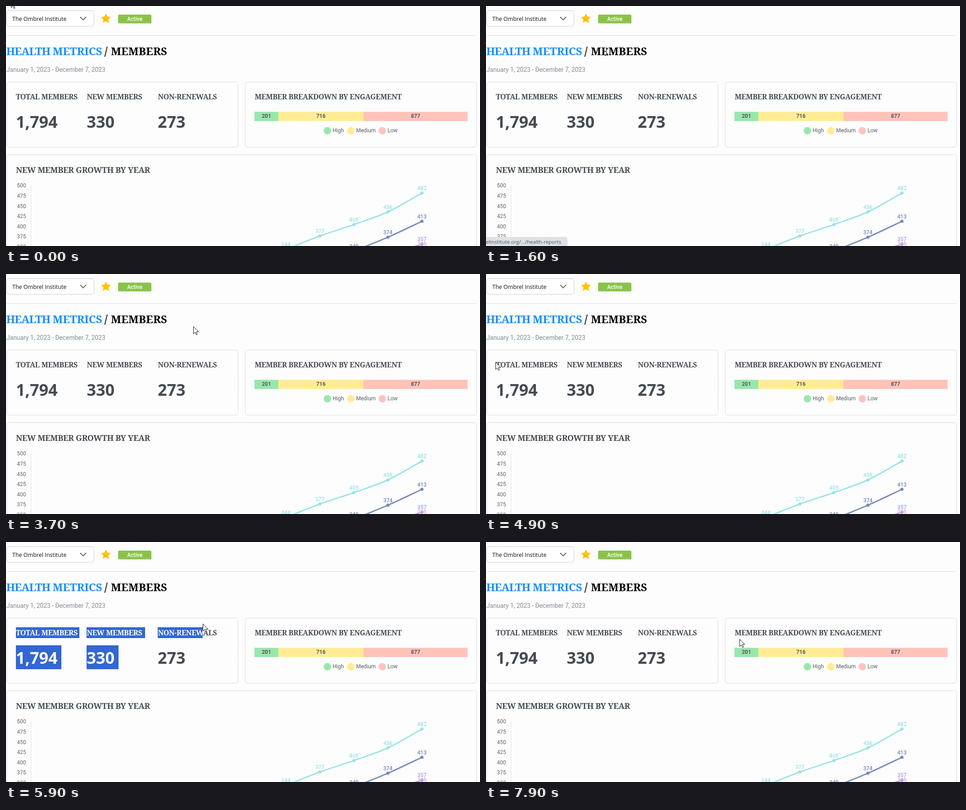
These frames come from a looping animation (1053 by 532 pixels, 8 s). An HTML page:

```html
<!DOCTYPE html>
<html lang="en">
<head>
<meta charset="utf-8">
<title>Member metrics</title>
<style>
  html, body { margin: 0; width: 100%; height: 100%; overflow: hidden; background: #fdfdfd; }
  svg { display: block; font-family: Roboto, sans-serif; }
  .slab { font-family: "Noto Serif", serif; font-weight: 600; letter-spacing: -0.33px; }
  .ui { font-family: "Open Sans", sans-serif; }
  .big { font: 700 36px "Open Sans", sans-serif; }
  .small { font-size: 12px; }
  .mid { text-anchor: middle; }
  .end { text-anchor: end; }
  .card { fill: none; stroke: #dadbdf; }
  #page { letter-spacing: 0.15px; }
  #ibeam { mix-blend-mode: difference; }
</style>
</head>
<body>
<svg width="1053" height="532" viewBox="0 0 1053 532">
  <defs>
    <g id="stats">
      <g class="slab" font-size="16">
        <text x="22" y="207">TOTAL MEMBERS</text>
        <text x="179.5" y="207">NEW MEMBERS</text>
        <text x="337.5" y="207">NON-RENEWALS</text>
      </g>
      <g class="big">
        <text x="22" y="270">1,794</text>
        <text x="179.5" y="270">330</text>
        <text x="337" y="270">273</text>
      </g>
    </g>
    <text id="page" class="slab" x="233" y="109" font-size="24">MEMBERS</text>
    <clipPath id="picked"></clipPath>
  </defs>
  <rect width="1053" height="532" fill="#fdfdfd"/>

  <rect x="1.5" y="10.5" width="194" height="34.5" rx="5" fill="#fff" stroke="#c9ccd1"/>
  <text class="ui" x="14" y="32.5" font-size="12.5" fill="#111">The Ombrel Institute</text>
  <path d="M164.8 24.2L171.4 30.8L178 24.2" fill="none" stroke="#555b61" stroke-width="1.8"/>
  <path id="star" fill="#ffc107" stroke="#ffc107" stroke-width="1.6" stroke-linejoin="round"/>
  <rect x="249" y="19" width="74" height="19.5" rx="3" fill="#8bc34a"/>
  <text class="small mid" x="286" y="32.6" font-weight="500" fill="#fff">Active</text>
  <path d="M1 65.5H1046" stroke="#d9dade"/>

  <g class="slab" font-size="24">
    <g fill="#148dff">
      <text x="0.5" y="109" style="letter-spacing:-0.8px">HEALTH</text>
      <text x="103.5" y="109" style="letter-spacing:-0.1px">METRICS</text>
    </g>
    <text x="218.5" y="109" font-size="25" style="font-weight:800">/</text>
  </g>
  <use href="#page" fill="#000"/>
  <text x="1" y="146" font-size="13.84" fill="#808c98">January 1, 2023 - December 7, 2023</text>

  <rect class="card" x="1.5" y="168.5" width="514" height="144.5" rx="5"/>
  <rect class="card" x="531.5" y="168.5" width="514" height="144.5" rx="5"/>
  <rect class="card" x="1.5" y="329.5" width="1044" height="230" rx="5"/>
  <use href="#stats" fill="#454b53"/>
  <g class="slab" fill="#454b53">
    <text x="552.5" y="207" font-size="16">MEMBER BREAKDOWN BY ENGAGEMENT</text>
    <text x="22" y="369.5" font-size="18">NEW MEMBER GROWTH BY YEAR</text>
  </g>
  <g id="bars" class="small" fill="#595d63"></g>
  <g id="chart" class="small"></g>

  <g id="marks" fill="#3367d1"></g>
  <g clip-path="url(#picked)" fill="#fff">
    <use href="#page"/>
    <use href="#stats"/>
  </g>

  <g id="status">
    <path d="M-1 533V512H176.5Q181 512 181 516.5V533Z" fill="#dee1e6"/>
    <text class="ui end" x="167" y="527" font-size="11.4" fill="#50565d">ombrelinstitute.org/.../health-reports</text>
  </g>

  <g id="arrow">
    <path d="M.5 .5V16.7L4.3 13.1L6.8 18.6L9.1 17.6L6.7 12.1H11.8Z" fill="#fff" stroke="#111"/>
  </g>
  <g id="hand">
    <path d="M-1.5 1.5Q0 -.5 1.5 1.5V7.5Q3.6 6 4.6 8.1Q6.6 6.9 7.7 9Q10.3 8.2 10.5 11V15Q10.3 17.6 8.6 19V21.5H-.6V19.5L-5 13.4Q-6 11.2 -3.6 11.3L-1.5 13Z" fill="#fff" stroke="#111"/>
  </g>
  <g id="ibeam">
    <path d="M-3 -8.5H-1L0 -7.5L1 -8.5H3M0 -7.5V7.5M-3 8.5H-1L0 7.5L1 8.5H3" fill="none" stroke="#fff"/>
  </g>
</svg>
<script>
const $ = id => document.getElementById(id);

function add(parent, tag, attrs, text) {
  const node = document.createElementNS('http://www.w3.org/2000/svg', tag);
  for (const key in attrs) node.setAttribute(key, attrs[key]);
  if (text !== undefined) node.textContent = text;
  parent.appendChild(node);
  return node;
}

// Static parts
$('star').setAttribute('d', 'M' + Array.from({ length: 10 }, (_, i) => {
  const r = i % 2 ? 4.7 : 10, a = i * Math.PI / 5;
  return (222 + r * Math.sin(a)).toFixed(2) + ' ' + (28.2 - r * Math.cos(a)).toFixed(2);
}).join('L') + 'Z');

const levels = [
  { name: 'High', count: 201, from: 552, to: 605, dot: 714, color: '#99e6ad' },
  { name: 'Medium', count: 716, from: 605, to: 794, dot: 766, color: '#ffec95' },
  { name: 'Low', count: 877, from: 794, to: 1025.5, dot: 836, color: '#ffc3b9' }
];
for (const b of levels) {
  add($('bars'), 'rect', { x: b.from, y: 234.5, width: b.to - b.from, height: 20.5, fill: b.color });
  add($('bars'), 'text', { x: (b.from + b.to) / 2, y: 248.3, class: 'mid', 'font-weight': 700 }, b.count);
  add($('bars'), 'circle', { cx: b.dot, cy: 276.5, r: 8.3, fill: b.color });
  add($('bars'), 'text', { x: b.dot + 11.7, y: 280 }, b.name);
}

const chart = $('chart');
const valueY = v => 398.4 + (500 - v) * 0.906;
add(chart, 'path', { d: 'M55.5 398V532', stroke: '#dfe0e4' });
for (let v = 500; v >= 350; v -= 25) {
  add(chart, 'text', { x: 44.5, y: valueY(v) + 3.8, class: 'end', fill: '#62666c' }, v);
}

function curve(pts) {
  let d = 'M' + pts[0];
  for (let i = 0; i < pts.length - 1; i++) {
    const a = pts[i - 1] || pts[i], b = pts[i], c = pts[i + 1], e = pts[i + 2] || c;
    d += `C${b[0] + (c[0] - a[0]) / 6} ${b[1] + (c[1] - a[1]) / 6} ` +
         `${c[0] - (e[0] - b[0]) / 6} ${c[1] - (e[1] - b[1]) / 6} ${c}`;
  }
  return d;
}

// Each series ends at the last column
const series = [
  { color: '#98e2e8', values: [310, 344, 377, 405, 436, 482] },
  { color: '#7489b9', values: [305, 340, 374, 413] },
  { color: '#9aa5e6', values: [300, 330, 357] },
  { color: '#e2a3e0', values: [290, 320, 346] }
];
for (const s of series) {
  const pts = s.values.map((v, i) => [924 - 75.6 * (s.values.length - 1 - i), valueY(v)]);
  add(chart, 'path', { d: curve(pts), fill: 'none', stroke: s.color, 'stroke-width': 2.8 });
  pts.forEach(([x, y], i) => {
    add(chart, 'circle', { cx: x, cy: y, r: 3.5, fill: s.color });
    add(chart, 'text', { x, y: y - 6.7, class: 'mid', 'font-weight': 500, fill: s.color }, s.values[i]);
  });
}

// Pointer: time, x, y, shape
const pointer = [
  [0, 11, -13, 'arrow'], [100, 11, -13, 'arrow'], [800, 72, 82, 'arrow'], [900, 80, 92, 'hand'],
  [1000, 86, 102, 'hand'], [1100, 176, 108, 'hand'], [1200, 176, 108, 'hand'],
  [1300, 236, 104, 'ibeam'], [1400, 303, 101, 'ibeam'], [1600, 267, 101, 'ibeam'],
  [1700, 267, 101, 'ibeam'], [1800, 262, 101, 'ibeam'], [2000, 234, 101, 'ibeam'],
  [2200, 234, 101, 'ibeam'], [2300, 254, 101, 'ibeam'], [2400, 272, 101, 'ibeam'],
  [2600, 335, 102, 'ibeam'], [2800, 370, 104, 'ibeam'], [2900, 370, 104, 'ibeam'],
  [3000, 366, 105, 'ibeam'], [3300, 366, 105, 'ibeam'], [3400, 416, 116, 'arrow'],
  [3800, 416, 116, 'arrow'], [4700, 20, 195, 'arrow'], [4800, 20, 195, 'arrow'],
  [4900, 21, 195, 'arrow'], [5000, 21, 195, 'arrow'], [5100, 60, 205, 'ibeam'],
  [5200, 105, 232, 'ibeam'], [5400, 244, 262, 'ibeam'], [5500, 244, 262, 'ibeam'],
  [5600, 310, 232, 'arrow'], [5900, 437, 181, 'arrow'], [6100, 450, 171, 'arrow'],
  [6300, 459, 198, 'ibeam'], [6800, 460, 198, 'ibeam'], [6900, 470, 200, 'arrow'],
  [7700, 567, 218, 'arrow'], [7900, 563, 215, 'arrow']
];

// Selected blocks so far; the fraction is the part of the next block
const drag = [
  [5000, 0], [5100, 0.28], [5200, 1.8], [5300, 2.6], [5400, 3.86], [5500, 3.86],
  [5600, 4.1], [5900, 4.76], [6300, 4.92], [6900, 4.93]
];

function at(keys, t) {
  let i = keys.length - 1;
  while (i > 0 && keys[i][0] > t) i--;
  const a = keys[i], b = keys[i + 1];
  if (!b) return a;
  const k = Math.max(0, (t - a[0]) / (b[0] - a[0]));
  return a.map((v, j) => typeof v === 'number' ? v + (b[j] - v) * k : v);
}

// Selectable blocks: left, right, top, bottom
const blocks = [
  [233, 357, 84, 115],
  [22, 163, 189, 213], [22, 123, 229, 282],
  [179, 309, 189, 213], [179, 250, 229, 282],
  [337, 469, 189, 213]
];
const boxes = blocks.map(([x, , y, bottom]) => {
  const attrs = { x, y, width: 0, height: bottom - y };
  return [add($('marks'), 'rect', attrs), add($('picked'), 'rect', attrs)];
});
const clamp = v => Math.min(1, Math.max(0, v));

function draw(ms) {
  const t = Math.floor(ms / 100) * 100;
  const [, x, y, shape] = at(pointer, t);
  for (const id of ['arrow', 'hand', 'ibeam']) {
    $(id).setAttribute('display', id === shape ? 'inline' : 'none');
  }
  const snap = shape === 'ibeam' ? 0.5 : 0;
  $(shape).setAttribute('transform', `translate(${Math.round(x) + snap} ${Math.round(y)})`);
  $('status').setAttribute('display', t >= 900 && t < 1900 ? 'inline' : 'none');

  const title = t >= 2300 && t < 3600 ? clamp((x - 233) / 124) : 0;
  const done = t >= 5100 && t < 6900 ? at(drag, t)[1] : 0;
  blocks.forEach(([left, right], i) => {
    const part = i ? clamp(done - i + 1) : title;
    for (const box of boxes[i]) box.setAttribute('width', Math.round((right - left) * part));
  });
}

const start = performance.now();
function tick() {
  draw((performance.now() - start) % 8000);
  requestAnimationFrame(tick);
}
tick();
</script>
</body>
</html>
```
